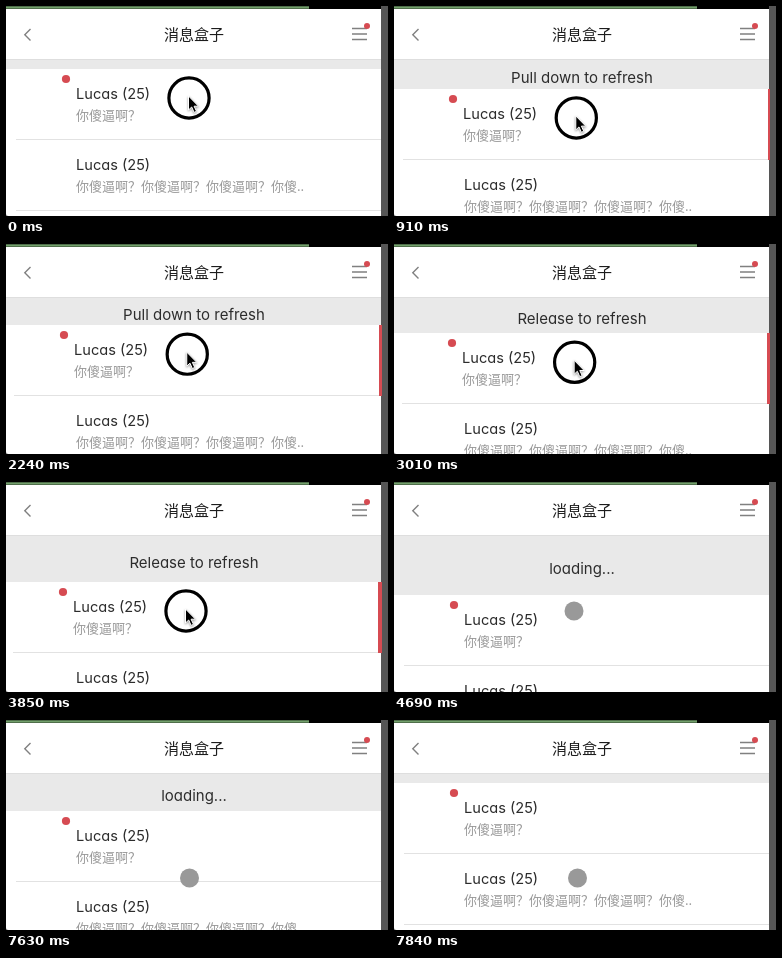
These frames come from a looping animation (382 px wide and 210 px high, 7980 ms). An HTML page:

```html
<!DOCTYPE html>
<html lang="zh">
<head>
<meta charset="utf-8">
<title>Pull to refresh</title>
<style>
  html, body { margin: 0; width: 100%; height: 100%; overflow: hidden; background: #fff; }
  svg { display: block; }
  .latin { font: 400 14.6px Inter, Lato, sans-serif; font-feature-settings: "cv11"; fill: #2c2c2c; }
  #label { font-size: 15px; }
  .cjk { font: 500 13px "Noto Sans CJK SC", "Noto Sans CJK", sans-serif; fill: #999; }
  .title { font-size: 15px; font-weight: 400; fill: #1c1c1c; }
  .badge { fill: #d64b52; }
  .arrow { fill: #000; stroke: #fff; filter: drop-shadow(0 1px 1px #0006); }
</style>
</head>
<body>
<svg width="382" height="210" viewBox="0 0 382 210">
  <rect width="382" height="210" fill="#e9e9e9"/>
  <rect x="375" width="7" height="210" fill="#565656"/>

  <svg id="pullBox" x="0" y="63" width="375" height="0">
    <text id="label" class="latin" x="188" text-anchor="middle"></text>
  </svg>

  <g id="list">
    <rect y="63" width="375" height="210" fill="#fff"/>
    <g id="firstRow">
      <circle class="badge" cx="60" cy="73" r="4.1"/>
      <text class="latin" x="70" y="93">Lucas (25)</text>
      <text class="cjk" x="70" y="114">你傻逼啊？</text>
      <rect x="10" y="133" width="365" height="1" fill="#e2e2e2"/>
    </g>
    <rect id="deleteBar" class="badge" y="63" height="71"/>
    <text class="latin" x="70" y="164">Lucas (25)</text>
    <text class="cjk" x="70" y="185">你傻逼啊？你傻逼啊？你傻逼啊？你傻..</text>
    <rect x="10" y="204" width="365" height="1" fill="#e2e2e2"/>
  </g>

  <rect width="375" height="53" fill="#fff"/>
  <rect y="53" width="375" height="1" fill="#dedede"/>
  <path d="M24.5 23L18.8 28.7L24.5 34.4" fill="none" stroke="#808080" stroke-width="1.4"/>
  <text class="cjk title" x="188" y="34" text-anchor="middle">消息盒子</text>
  <path d="M346 22.5h15M346 28h15M346 33.5h15" stroke="#808080" stroke-width="1.4"/>
  <circle class="badge" cx="361" cy="20" r="3"/>

  <rect width="375" height="3" fill="#000"/>
  <rect width="303" height="3" fill="#4f6f4a"/>
  <rect y="1" width="303" height="1" fill="#73a06c"/>
  <path d="M0 207.5Q0 210 2.5 210H0Z" fill="#666"/>

  <g id="press">
    <circle r="20.1" fill="none" stroke="#000" stroke-width="3.2"/>
    <path class="arrow" d="M-.5 -2V12L2.7 9L5.1 14.4L7.5 13.3L5.1 8.2H9.5Z"/>
  </g>
  <circle id="dot" r="9.5" fill="#999"/>
</svg>
<script>
const LOOP = 7980, STEP = 70, RELEASE = 4480;
const $ = id => document.getElementById(id);
const pullBox = $('pullBox'), label = $('label'), list = $('list'), firstRow = $('firstRow'),
      deleteBar = $('deleteBar'), press = $('press'), dot = $('dot');

const progress = (t, from, to) => Math.min(1, Math.max(0, (t - from) / (to - from)));
// Eases out from 0 to 1; a higher power starts faster.
const ease = (t, from, to, power) => 1 - (1 - progress(t, from, to)) ** power;

// Pull down, back up, down again, settle while loading, close.
function pullAt(t) {
  return 29 * ease(t, 0, 1540, 1.3)
    - 13.5 * ease(t, 1890, 2380, 1.3)
    + 21.5 * ease(t, 2660, 3850, 2)
    + 13 * ease(t, RELEASE - STEP, 4690, 2)
    - 50 * ease(t, 7560, 7840, 2);
}

function swipeAt(t) {
  return -3 * progress(t, 0, 3850) * (1 - ease(t, RELEASE - STEP, 4690, 2));
}

function pointerAt(t) {
  if (t < RELEASE) return [183 + swipeAt(t), 92 + pullAt(t)];
  const arc = progress(t, 5250, 5810);
  return [
    180 + 3.5 * arc - 39 * Math.sin(Math.PI * arc),
    129 + 16 * arc + 13 * progress(t, 6160, 6440)
  ];
}

function render(now) {
  const t = Math.floor(now / STEP) * STEP;
  const down = t < RELEASE;
  const distance = pullAt(t);
  const dragging = !down || distance >= 6; // the list waits for a clear drag
  const pull = dragging ? Math.round(distance) : 0;
  const swipe = dragging ? Math.round(swipeAt(t)) : 0;

  pullBox.setAttribute('height', pull);
  label.setAttribute('y', pull / 2 + 4);
  label.textContent = !down ? 'loading...' : pull >= 25 ? 'Release to refresh' : 'Pull down to refresh';
  list.setAttribute('transform', `translate(0 ${pull})`);
  firstRow.setAttribute('transform', `translate(${swipe} 0)`);
  deleteBar.setAttribute('x', 375 + swipe);
  deleteBar.setAttribute('width', swipe ? 1 - swipe : 0);

  const place = `translate(${pointerAt(t).join(' ')})`;
  press.setAttribute('transform', place);
  dot.setAttribute('transform', place);
  press.style.display = down ? '' : 'none';
  dot.style.display = down ? 'none' : '';
}

const start = performance.now();
function frame() {
  render((performance.now() - start) % LOOP);
  requestAnimationFrame(frame);
}
frame();
</script>
</body>
</html>
```
